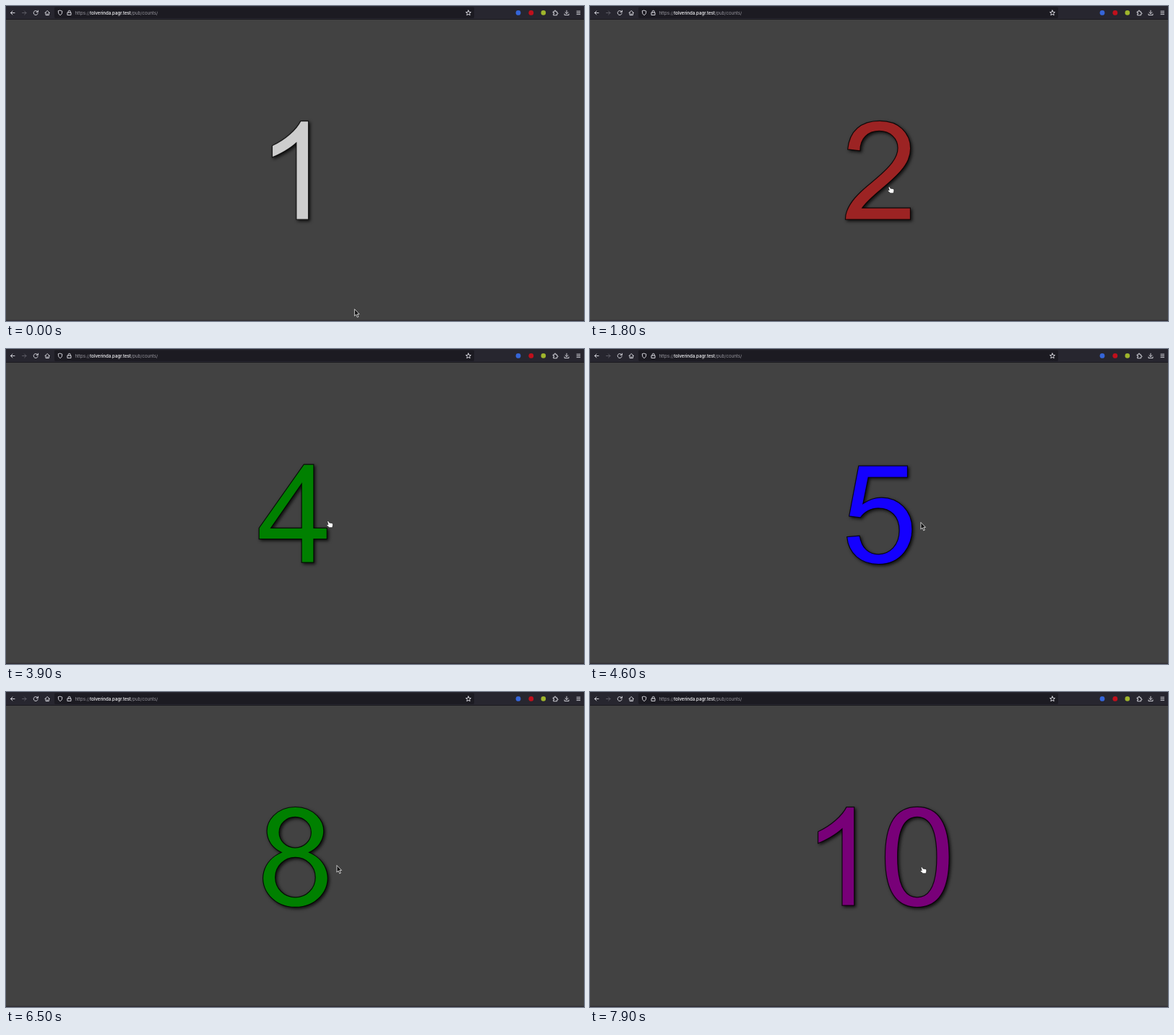
Write an HTML page that moves like this. It is 800x437 px and loops after 8100 ms.

```html
<!DOCTYPE html>
<html lang="en">
<head>
<meta charset="utf-8">
<title>Number counter</title>
<style>
  html, body { margin: 0; width: 100%; height: 100%; overflow: hidden; background: #424242; }
  svg { display: block; width: 100%; height: 100%; }
  text { font: 6.1px Inter, sans-serif; fill: #9a99a0; }
  .host { fill: #fbfbfe; font-weight: 500; }
  .icons { fill: none; stroke: #e4e4ea; stroke-width: .9; stroke-linecap: round; stroke-linejoin: round; }
  #number { filter: drop-shadow(2.5px 2.5px 2px rgba(0, 0, 0, .8)); }
  #number path { stroke: rgba(0, 0, 0, .8); stroke-width: 13; }
</style>
</head>
<body>
<svg viewBox="0 0 800 437">
  <rect width="800" height="437" fill="#424242"/>
  <rect y="435.6" width="800" height="1.4" fill="#302d33"/>
  <rect width="800" height="18.5" fill="#27262f"/>
  <rect y="18" width="800" height=".8" fill="#16151a"/>
  <rect x="67" y="1.5" width="581" height="15.5" rx="2" fill="#1c1b22"/>
  <text x="95.5" y="11.8">https://<tspan class="host">tolverinda.pagr.test</tspan>/pub/counts/</text>

  <g class="icons">
    <path d="M12 9.5H6.5M9 7L6.5 9.5 9 12"/>
    <path d="M22.5 9.5H28M25.5 7L28 9.5 25.5 12" stroke="#62616a"/>
    <path d="M43.8 8A3 3 0 1 0 44.1 10.3M44.4 6.2V8.4H42.2"/>
    <path d="M54 9.6L57.2 6.4 60.4 9.6M55 9V12.6H59.4V9M57.2 12.5V10.7"/>
    <path d="M75 6.2L77.8 7.2Q78 11.3 75 12.9Q72 11.3 72.2 7.2Z"/>
    <path d="M85.3 9H90V12.5H85.3ZM86.2 9V7.7A1.45 1.45 0 0 1 89.1 7.7V9"/>
    <path d="M640 6L641 8.4 643.5 8.6 641.6 10.2 642.2 12.7 640 11.4 637.8 12.7 638.4 10.2 636.5 8.6 639 8.4Z"/>
    <path d="M757.6 7.8H759.2Q758.7 6 760 6T760.8 7.8H762.6V9.6Q764 9.2 764 10.3T762.6 11V12.8H757.6V11Q759 11 759 10.1T757.6 9.4Z"/>
    <path d="M776 6.2V10.5M774 8.7L776 10.7 778 8.7M773 11V12.6H779V11"/>
    <path d="M790 7.2H794.6M790 9.4H794.6M790 11.6H794.6"/>
  </g>
  <circle cx="709" cy="9.4" r="3.4" fill="#3565d8"/>
  <circle cx="726.8" cy="9.4" r="3.4" fill="#c0101c"/>
  <circle cx="743.8" cy="9.4" r="3.3" fill="#9fb52c"/>

  <g id="number"></g>
  <g id="cursor" stroke-linejoin="round">
    <path id="arrow" fill="#111" stroke="#eee" stroke-width=".8"
      d="M.4 .5V10L2.6 8 4.2 11.8 5.8 11.1 4.2 7.4H7Z"/>
    <path id="hand" fill="#fff" stroke="#111" stroke-width=".6"
      d="M.6 3.5Q1.3 2.2 2.4 3.1L3.4 5.1 7.6 5.7Q8.6 6.8 8.2 9L7.5 11.7H3.4L-.2 8.8Q-.7 7.4 .7 7.4L1.8 7.8Z"/>
  </g>
</svg>
<script>
const LOOP = 8100, STEP = 100;
const FONT_SIZE = 190, UNITS = 2048, ADVANCE = 1139;
const CENTER = 400.6, BASELINE = 296.2;

// Digit outlines on a 2048-unit em, y pointing up. Six is nine turned upside down.
const glyphs = {
  0: 'M85 724C85 223 240 -25 563 -25S1040 223 1040 724S885 1474 563 1474S85 1225 85 724Z' +
     'M270 724C270 1125 370 1324 563 1324S855 1125 855 724S755 123 563 123S270 323 270 724Z',
  1: 'M763 0H583V1147Q518 1085 412 1023T223 930V1104Q374 1175 487 1276T647 1472H763Z',
  2: 'M1031 173V0H62Q60 65 83 125Q120 224 201 320T437 542Q676 738 760 852T844 1069' +
     'Q844 1176 767 1249T568 1323Q438 1323 360 1245T281 1029L96 1048Q115 1256 239 1365' +
     'T574 1474Q786 1474 909 1356T1033 1065Q1033 977 997 892T877 713T600 455Q385 275 312 173Z',
  3: 'M86 387L266 411Q297 258 371 190T553 123Q680 123 767 211T855 429Q855 553 774 633' +
     'T568 714Q517 714 441 694L461 852Q605 843 697 911T789 1096Q789 1195 722 1260T549 1325' +
     'Q444 1325 374 1259T284 1061L104 1093Q137 1274 254 1373T545 1473Q665 1473 766 1421' +
     'T920 1281T974 1092Q974 994 921 913T766 786Q899 755 973 658T1047 417' +
     'Q1047 222 905 98T553 -26Q358 -26 231 89T86 387Z',
  4: 'M662 0V351H26V516L695 1466H842V516H1040V351H842V0ZM662 516V1177L203 516Z',
  5: 'M85 384L274 400Q295 262 371 192T556 123Q686 123 776 221T866 481Q866 635 779 724' +
     'T553 813Q466 813 396 773T286 671L117 693L259 1446H988V1274H403L324 880' +
     'Q456 972 601 972Q793 972 925 839T1057 497Q1057 298 941 153Q800 -25 556 -25' +
     'Q356 -25 229 87T85 384Z',
  7: 'M97 1274V1447H1046V1307Q906 1158 768 911T556 403Q502 216 487 0H302Q305 171 369 413' +
     'T554 879T811 1274Z',
  8: 'M362 795A423 362 0 1 0 773 795A483 430 0 1 0 362 795Z' +
     'M326 1094A239 230 0 1 1 804 1094A239 230 0 1 1 326 1094Z' +
     'M268 421A299 298 0 1 1 867 421A299 298 0 1 1 268 421Z',
  9: 'M112 339L285 355Q307 233 369 178T528 123Q611 123 673 161T776 262T843 434T870 654V690' +
     'Q815 604 721 550T519 497Q338 497 213 628T88 973Q88 1194 218 1334T545 1474' +
     'C880 1474 1049 1220 1049 770C1049 250 860 -25 518 -25Q346 -25 238 69T112 339Z' +
     'M855 982Q855 1139 771 1231T570 1323Q448 1323 357 1223T267 964Q267 821 353 731' +
     'T567 642Q695 642 775 731T855 982Z'
};

const counts = [
  { at: 0, color: '#cdcdcd' },
  { at: 1800, color: '#9c2323' },
  { at: 2700, color: '#ffff00' },
  { at: 3700, color: '#008000' },
  { at: 4400, color: '#1400ff' },
  { at: 5100, color: '#ffa500' },
  { at: 5700, color: '#9c2323' },
  { at: 6500, color: '#008000' },
  { at: 7100, color: '#ffb6c1' },
  { at: 7800, color: '#780078' }
];

// Pointer hot spot: time, x, y.
const pointerPath = [
  [0, 482, 420], [400, 445.5, 261], [500, 445.5, 261], [1000, 412.5, 248],
  [3000, 412.5, 248], [3200, 420.5, 244], [3400, 437.5, 234],
  [3700, 437.5, 234], [4300, 457.5, 240], [LOOP, 457.5, 240]
];

const byId = id => document.getElementById(id);
const start = performance.now();
let shown = 0;

function glyph(digit, x, color) {
  const scale = FONT_SIZE / UNITS;
  const flipped = digit === '6';
  return `<path d="${glyphs[flipped ? 9 : digit]}" fill="${color}"
    transform="translate(${x} ${BASELINE}) scale(${scale} ${-scale}) rotate(${flipped ? 180 : 0} 569 724)"/>`;
}

function showNumber(value, width) {
  if (value === shown) return;
  shown = value;
  const digits = [...String(value)];
  const advance = width / digits.length;
  byId('number').innerHTML = digits
    .map((digit, i) => glyph(digit, CENTER - width / 2 + i * advance, counts[value - 1].color))
    .join('');
}

function pointerAt(time) {
  const next = pointerPath.findIndex(point => point[0] > time);
  const [t0, x0, y0] = pointerPath[next - 1];
  const [t1, x1, y1] = pointerPath[next];
  const k = (time - t0) / (t1 - t0);
  return [x0 + (x1 - x0) * k, y0 + (y1 - y0) * k];
}

function draw(now) {
  const elapsed = Math.max(0, now - start);
  const time = Math.floor(elapsed % LOOP / STEP) * STEP;
  const value = counts.filter(count => count.at <= time).length;
  const width = String(value).length * ADVANCE * FONT_SIZE / UNITS;
  showNumber(value, width);

  const [x, y] = pointerAt(time);
  const hovering = Math.abs(x - CENTER) < width / 2 && Math.abs(y - 230) < 110;
  byId('cursor').setAttribute('transform', `translate(${x} ${y})`);
  byId('hand').style.display = hovering ? '' : 'none';
  byId('arrow').style.display = hovering ? 'none' : '';
  requestAnimationFrame(draw);
}

draw(start);
</script>
</body>
</html>
```
